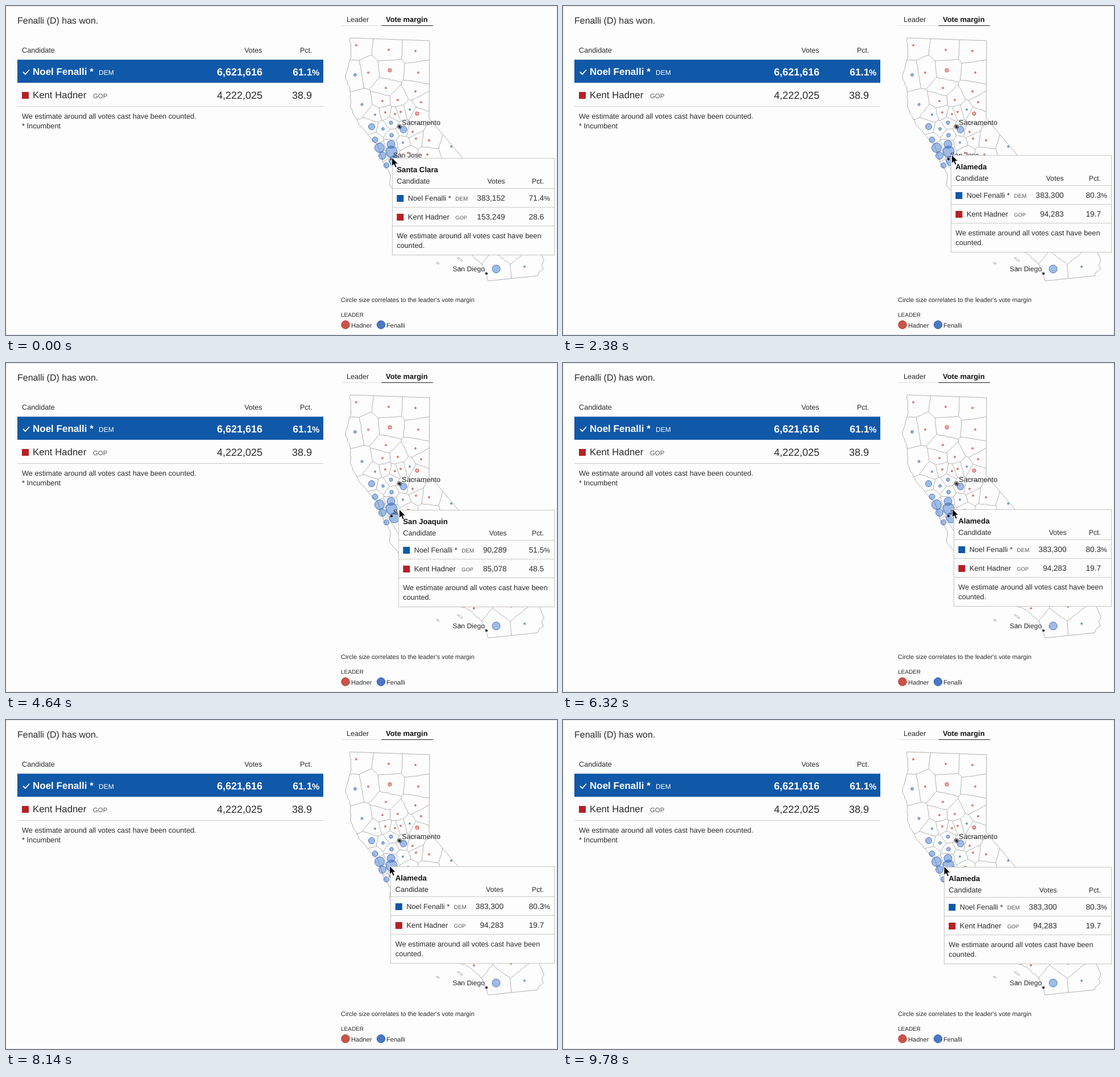
An HTML page that plays this animation: 969x578 px, repeating every 9880 ms.

```html
<!DOCTYPE html>
<html lang="en">
<head>
<meta charset="utf-8">
<title>Election result map</title>
<style>
html, body { margin: 0; width: 100%; height: 100%; overflow: hidden; background: #fdfdfd; }
svg { display: block; font-family: "Liberation Sans", Arial, sans-serif; text-rendering: geometricPrecision; }
text { fill: #2a2a2a; white-space: pre; }
.b { font-weight: 700; fill: #111; }
.r { text-anchor: end; }
.w { fill: #fff; }
.g { fill: #555; }
.map { fill: none; stroke: #a2a2a2; stroke-width: .85; stroke-linejoin: round; }
.rule { stroke: #cacac6; }
</style>
</head>
<body>
<svg id="stage" width="969" height="578" viewBox="0 0 969 578"></svg>
<script>
const BLUE = '#1058a8', RED = '#b72025', LOOP = 9880;
const WINNER = 'Noel Fenalli', RIVAL = 'Kent Hadner';
const last = name => name.split(' ')[1];

const text = (x, y, size, str, cls = '', id = '') =>
  `<text x="${x}" y="${y}" font-size="${size}" class="${cls}" id="${id}">${str}</text>`;
const rect = (x, y, w, h, fill) => `<rect x="${x}" y="${y}" width="${w}" height="${h}" fill="${fill}"/>`;
const rule = (x1, x2, y, color = '#cacac6') => `<path d="M${x1} ${y}H${x2}" stroke="${color}"/>`;
const dot = (x, y, r, fill = '#111', extra = '') => `<circle cx="${x}" cy="${y}" r="${r}" fill="${fill}" ${extra}/>`;

// County centres: x, y and, for the larger margins, a radius
const redSpots = [
  [675,113,3.2], [723,189,3.2], [616,69], [673,77], [720,79], [637,117], [725,117], [668,144], [720,150],
  [662,167], [689,165], [730,169], [667,187], [684,190], [694,186], [715,221], [721,233], [744,236],
  [741,261], [707,258], [823,431], [888,428]
];
const blueSpots = [
  [678,256,10], [683,272,9], [657,249,8.5], [677,243,7], [862,462,7], [662,263,6.5], [699,217,6], [643,212,5.5],
  [649,235,5], [669,280,4.7], [678,227,3.3], [677,205,3], [614,121,2.4], [663,216,2.4], [626,173,2],
  [649,191], [710,182], [698,240], [783,247], [912,458]
];
const spots = (list, fill, stroke) =>
  `<g fill-opacity=".42" stroke="${stroke}" stroke-width=".9">` +
  list.map(([x, y, r = 1.4]) => dot(x, y, r, fill)).join('') + '</g>';

let seed = 11;
const jitter = () => (seed = seed * 16807 % 2147483647) / 2147483647 * 2 - 1;

// Wavering line from a to b
function rough(a, b, amount) {
  const n = Math.ceil(Math.hypot(b[0] - a[0], b[1] - a[1]) / 5);
  return Array.from({ length: n }, (_, i) => {
    const k = (i + 1) / n, wave = k < 1 ? amount : 0;
    return 'L' + a.map((v, j) => (v + (b[j] - v) * k + wave * jitter()).toFixed(1));
  }).join('');
}

const coast = [
  [605,56], [607,87], [597,125], [605,147], [606,178], [620,207], [638,228], [653,243], [663,275],
  [676,296], [674,313], [686,328], [722,395], [815,434], [838,455], [848,483]
];
const outline = 'M' + coast[0] + coast.slice(1).map((p, i) => rough(coast[i], p, .9)).join('') +
  'L935 474L937 468L945 462L942 455L946 447L936 424L744 197L745 61Z';

// Each county border is the part of a perpendicular bisector nearest to its two centres
function border(p, q, centres) {
  const mid = [(p[0] + q[0]) / 2, (p[1] + q[1]) / 2], dir = [p[1] - q[1], q[0] - p[0]];
  let lo = -6, hi = 6;
  for (const c of centres) {
    if (c === p || c === q) continue;
    const dx = c[0] - p[0], dy = c[1] - p[1];
    const slope = dir[0] * dx + dir[1] * dy;
    const limit = (((c[0] + p[0]) / 2 - mid[0]) * dx + ((c[1] + p[1]) / 2 - mid[1]) * dy) / slope;
    if (slope > 0) hi = Math.min(hi, limit);
    if (slope < 0) lo = Math.max(lo, limit);
  }
  if (lo >= hi) return '';
  const at = t => mid.map((v, j) => v + dir[j] * t);
  return 'M' + at(lo) + rough(at(lo), at(hi), .6);
}
const centres = [...redSpots, ...blueSpots];
const counties = centres.flatMap((p, i) => centres.slice(i + 1).map(q => border(p, q, centres))).join('');
const islands = 'M757 450l4 1l1 2l-4 0zM793 442l5 1l5 4l-1 2l-5 -3zM796 458l3 2l2 4l-3 -2z';

const table =
  text(20, 30.5, 16, `${last(WINNER)} (D) has won.`) +
  text(28, 82, 12.7, 'Candidate') + text(450.5, 82, 12.5, 'Votes', 'r') + text(538.5, 82, 12.5, 'Pct.', 'r') +
  rect(20, 94.3, 538, 40.6, BLUE) +
  '<path d="M30 116l4 4l7 -8" fill="none" stroke="#fff" stroke-width="1.8"/>' +
  text(47, 120.5, 17, `${WINNER} *`, 'b w') + text(163, 120.5, 12, 'DEM', 'w') +
  text(451, 121.5, 18, '6,621,616', 'b r w') + text(538.5, 121.5, 17.6, '61.1', 'b r w') + text(538, 121.5, 15, '%', 'b w') +
  rect(28, 151, 12, 12, RED) +
  text(47, 162, 16.8, RIVAL) + text(153, 161.5, 11.4, 'GOP', 'g') +
  text(451, 163, 18, '4,222,025', 'r') + text(538, 163, 18, '38.9', 'r') +
  rule(20, 558, 176.5) +
  text(28, 198, 12.75, 'We estimate around all votes cast have been counted.') +
  text(28, 215, 12.75, '* Incumbent');

const map =
  text(599, 28, 12.6, 'Leader') + text(668, 28, 12.9, 'Vote margin', 'b') +
  rule(589, 659, 34.5, '#ddd') + rule(660, 751, 34.5, '#222') +
  `<clipPath id="land"><path d="${outline}"/></clipPath>` +
  `<path class="map" d="${counties}" clip-path="url(#land)"/><path class="map" d="${outline}${islands}"/>` +
  spots(redSpots, '#d8392b', '#d04a3c') + spots(blueSpots, '#1f5fc0', '#3d6fc0') +
  dot(692, 212, 3.8, 'none', 'stroke="#222" stroke-width=".8"') +
  dot(692, 212, 2.4) + dot(678, 269, 2.1) + dot(845, 470, 2.1) +
  text(696, 209, 12.6, 'Sacramento') + text(681, 266, 12.1, 'San Jose') + text(785.5, 466, 12.1, 'San Diego') +
  text(589, 519.5, 11.03, "Circle size correlates to the leader's vote margin") +
  text(589, 545.5, 10, 'LEADER') +
  dot(597, 560, 7.2, '#cb5347', 'stroke="#b5382e"') + text(607, 564.5, 11.1, last(RIVAL)) +
  dot(659.5, 560, 7.2, '#4a78c4', 'stroke="#2b5fb0"') + text(669, 564.5, 11.1, last(WINNER));

const tooltip =
  '<rect id="box" height="170" fill="#fdfdfd" stroke="#c4c4c0"/><path id="rules" class="rule"/>' +
  '<g id="left">' +
  text(8, 25, 13.2, '', 'b', 'county') + text(8, 45, 12.75, 'Candidate') +
  rect(8, 65, 12, 12, BLUE) + text(27.5, 74.5, 12.75, `${WINNER} *`) + text(111, 74.5, 9.9, 'DEM', 'g') +
  rect(8, 98, 12, 12, RED) + text(27.5, 107.5, 13, RIVAL) + text(111, 107.5, 9.3, 'GOP', 'g') +
  text(8, 141, 12.75, 'We estimate around all votes cast have been') + text(8, 158, 12.75, 'counted.') + '</g>' +
  '<g id="votes">' + text(0, 45, 12.4, 'Votes', 'r') + text(0, 75, 13.6, '', 'r', 'votesA') +
  text(0, 108, 13.6, '', 'r', 'votesB') + '</g>' +
  '<g id="right">' + text(-18.5, 45, 12.4, 'Pct.', 'r') + text(-18.5, 75, 13.6, '', 'r', 'pctA') +
  text(-18.5, 75, 12, '%') + text(-18.5, 108, 13.6, '', 'r', 'pctB') + '</g>';

const cursor = '<path id="cursor" d="M0 0V15.5L3.6 12.2L6.2 18L8.8 16.9L6.3 11.2H11Z" fill="#000" stroke="#fff"/>';

const $ = id => document.getElementById(id);
$('stage').innerHTML = rect(0, 0, 969, 578, '#fdfdfd') +
  '<rect x=".5" y=".5" width="968" height="577" fill="none" stroke="#e6e6e6"/>' + table + map + tooltip + cursor;

// Time, tooltip x and y, and how far the pointer runs ahead of the tooltip
const track = [
  [0, 679, 267, -.5], [1420, 678, 264, 0], [3100, 685, 261, 2.5], [4640, 690, 258, 1.5],
  [6320, 687, 257, -2.5], [8140, 676.5, 257, -2], [9780, 670, 258, 0], [LOOP, 670, 258, 0]
];

// Start time, county and the votes of both candidates
const alameda = ['Alameda', 383300, 94283];
const hovers = [
  [0, 'Santa Clara', 383152, 153249], [2300, ...alameda], [3900, 'San Joaquin', 90289, 85078], [5500, ...alameda]
];

const move = (id, x, y) => $(id).setAttribute('transform', `translate(${x} ${y})`);

function draw(now) {
  const t = now % LOOP;
  const i = track.findIndex(key => key[0] > t);
  const a = track[i - 1], b = track[i], k = (t - a[0]) / (b[0] - a[0]);
  const [, x, y, lead] = a.map((v, j) => v + (b[j] - v) * k);

  const [, county, forA, forB] = hovers.findLast(h => h[0] <= t);
  const votesA = forA.toLocaleString('en-US'), votesB = forB.toLocaleString('en-US');
  const pct = votes => (100 * votes / (forA + forB)).toFixed(1);
  const labels = { county, votesA, votesB, pctA: pct(forA), pctB: pct(forB) };
  for (const id in labels) $(id).textContent = labels[id];

  const left = Math.round(x) + .5, top = Math.round(y) + .5;
  $('box').setAttribute('x', left);
  $('box').setAttribute('y', top);
  $('box').setAttribute('width', 964.5 - left);
  $('rules').setAttribute('d', [53, 86, 119].map(dy => `M${left} ${top + dy}H964.5`).join(''));
  move('left', x + .3, top - .5);
  move('votes', x + 142.5 + 8 * votesA.length, top - .5);
  move('right', 964.5, top - .5);
  move('cursor', x + lead, y - 1);
}

function tick() {
  draw(performance.now());
  requestAnimationFrame(tick);
}
tick();
</script>
</body>
</html>
```
